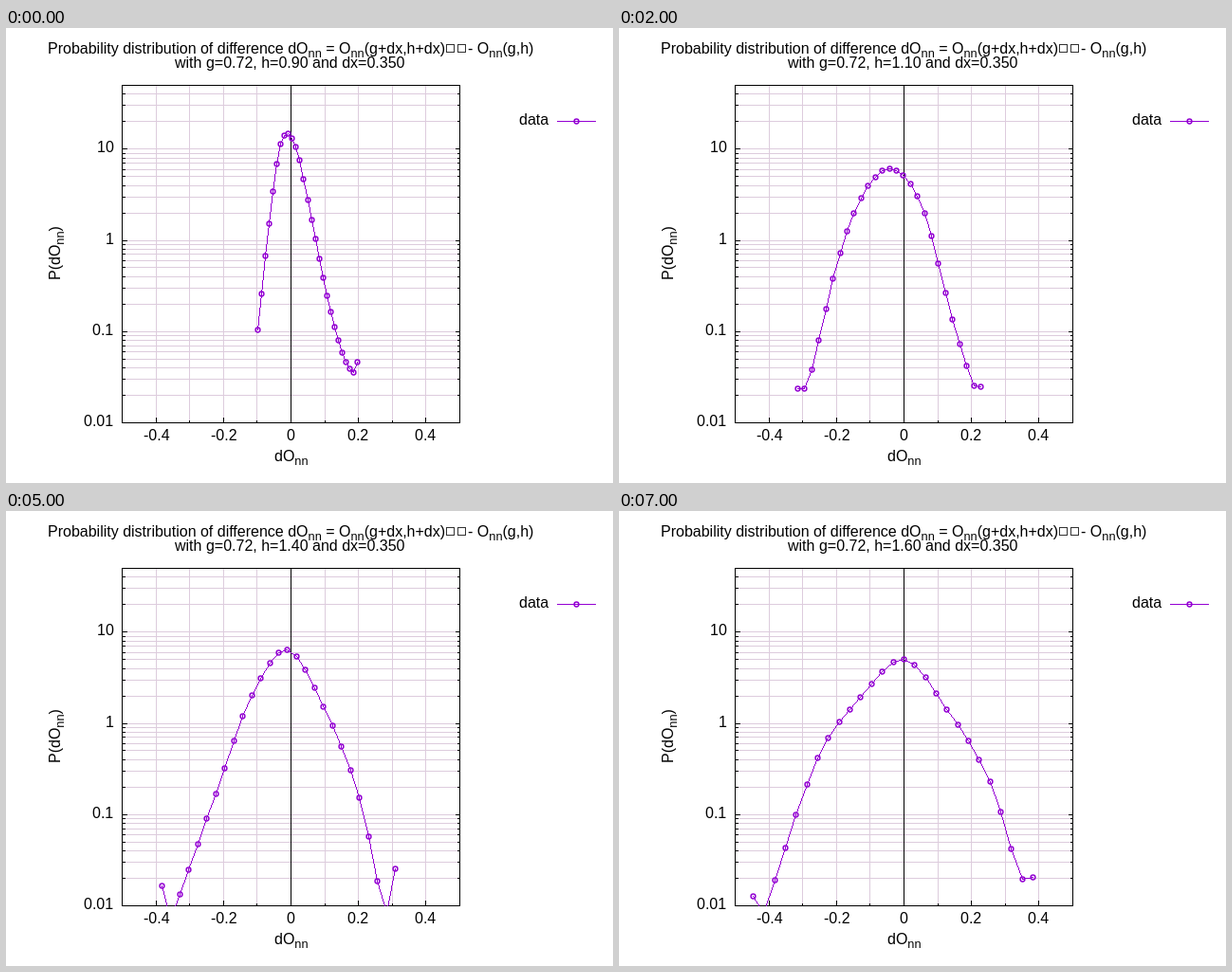
Recreate the animation shown at these times as an HTML page with a canvas. Size 640x480 px, loop 8 s.

```html
<!DOCTYPE html>
<html lang="en">
<head>
<meta charset="utf-8">
<title>Probability distribution</title>
<style>
html, body { margin: 0; width: 640px; height: 480px; overflow: hidden; background: #fff; }
canvas { display: block; }
</style>
</head>
<body>
<canvas id="stage" width="640" height="480"></canvas>
<script>
const ctx = document.getElementById('stage').getContext('2d');
const VIOLET = '#9400d3', GRID = '#ddccdd';
const FONT = '"Liberation Sans", Arial, sans-serif';
const BOX = { left: 122, top: 60, size: 356 };
const BOTTOM = BOX.top + BOX.size, RIGHT = BOX.left + BOX.size;
const DECADE = BOX.size / Math.log10(5000);
const STEP_MS = 1000, BINS = 27;

const px = v => Math.round(300 + BOX.size * v);
const py = v => Math.round(BOTTOM - DECADE * Math.log10(v / 0.01));

// Each curve has a few key heights at these bins; a spline gives the rest.
const KEY_BINS = [0, 1, 2, 6, 10, 14, 18, 22, 25, 26];
const h090 = [318, 280, 240, 122, 125, 202, 282, 342, 363, 352];
const h100 = [379, 380, 336, 199, 141, 147, 209, 321, 346, 372];
const h120 = [369, 428, 370, 261, 177, 138, 167, 279, 393, 369];
const h130 = [383, 432, 406, 319, 228, 144, 155, 265, 347, 369];
const h140 = [395, 430, 404, 298, 194, 146, 206, 302, 423, 377];
const h160 = [406, 424, 389, 260, 196, 156, 209, 285, 388, 386];

const blend = (a, b, drop, lowest) =>
  a.map((y, i) => Math.min((y + b[i]) / 2 + drop, lowest));

const curves = [
  { from: 265, to: 370, keys: h090 },
  { from: 226, to: 371, keys: h100 },
  { from: 188, to: 381, keys: blend(h100, h120, 7, 380) },
  { from: 186, to: 364, keys: h120 },
  { from: 184, to: 370, keys: h130 },
  { from: 164, to: 410, keys: h140 },
  { from: 155, to: 424, keys: blend(h140, h160, 0, 430) },
  { from: 141, to: 436, keys: h160 }
];

function spline(keys, bin) {
  const last = KEY_BINS.length - 1;
  const slope = k => {
    const a = Math.max(k - 1, 0), b = Math.min(k + 1, last);
    return (keys[b] - keys[a]) / (KEY_BINS[b] - KEY_BINS[a]);
  };
  const i = Math.max(KEY_BINS.findIndex(b => b >= bin), 1) - 1;
  const w = KEY_BINS[i + 1] - KEY_BINS[i];
  const t = (bin - KEY_BINS[i]) / w, s = 1 - t;
  return s * s * ((1 + 2 * t) * keys[i] + t * w * slope(i)) +
         t * t * ((1 + 2 * s) * keys[i + 1] - s * w * slope(i + 1));
}

function rect(color, x, y, w, h) {
  ctx.fillStyle = color;
  ctx.fillRect(x, y, w, h);
}

function pixelLine(x0, y0, x1, y1) {
  const n = Math.max(Math.abs(x1 - x0), Math.abs(y1 - y0));
  for (let i = 0; i <= n; i++) {
    rect(VIOLET, Math.round(x0 + (x1 - x0) * i / n), Math.round(y0 + (y1 - y0) * i / n), 1, 1);
  }
}

function marker(x, y) {
  ctx.strokeStyle = VIOLET;
  ctx.lineWidth = 1.5;
  ctx.beginPath();
  ctx.arc(x + 0.5, y + 0.5, 2.4, 0, 2 * Math.PI);
  ctx.stroke();
  rect(VIOLET, x, y, 1, 1);
}

// "anchor" is the share of the width left of x: 0.5 centres, 1 aligns right.
function text(str, x, y, anchor = 0.5) {
  ctx.font = '16px ' + FONT;
  ctx.fillStyle = '#000';
  ctx.fillText(str, Math.round(x - anchor * ctx.measureText(str).width), y);
}

// "_" stands for the subscript nn, "#" for an empty glyph box.
function richText(str, x, y) {
  for (const part of str.split(/([_#])/)) {
    if (part === '#') {
      ctx.strokeStyle = '#333';
      ctx.lineWidth = 1;
      ctx.strokeRect(Math.round(x) + 1.5, y - 9.5, 8, 8);
      x += 12;
      continue;
    }
    const sub = part === '_', run = sub ? 'nn' : part;
    ctx.font = (sub ? 12.8 : 16) + 'px ' + FONT;
    ctx.fillStyle = '#000';
    ctx.fillText(run, x, sub ? y + 4 : y);
    x += ctx.measureText(run).width;
  }
}

function drawAxes() {
  const xs = [], ys = [];
  for (let k = -4; k <= 4; k++) xs.push({ at: px(k / 10), major: k % 2 === 0, label: k / 10 });
  for (let e = -2; e <= 1; e++) {
    for (let m = 1; m <= 9; m++) {
      const v = m * 10 ** e;
      if (v < 45) ys.push({ at: py(v), major: m === 1, label: (10 ** e).toFixed(Math.max(0, -e)) });
    }
  }
  for (const t of xs) rect(GRID, t.at, BOX.top, 1, BOX.size);
  for (const t of ys) rect(GRID, BOX.left, t.at, BOX.size, 1);
  for (const t of xs) {
    const length = t.major ? 5 : 2;
    rect('#000', t.at, BOTTOM - length, 1, length);
    if (t.major) text(t.label, t.at + 0.5, 435);
  }
  for (const t of ys) {
    const length = t.major ? 4 : 2;
    rect('#000', BOX.left, t.at, length + 2, 1);
    rect('#000', RIGHT - length, t.at, length, 1);
    if (t.major) text(t.label, 113.5, t.at + 4, 1);
  }
  ctx.strokeStyle = '#000';
  ctx.lineWidth = 1;
  ctx.strokeRect(BOX.left + 0.5, BOX.top + 0.5, BOX.size, BOX.size);
  rect('#000', px(0), BOX.top, 1, BOX.size);
}

function drawLabels(h) {
  richText('Probability distribution of difference dO_ = O_(g+dx,h+dx)##- O_(g,h)', 44, 27);
  text(`with g=0.72, h=${h.toFixed(2)} and dx=0.350`, 299.5, 42);
  richText('dO_', 283, 457);
  ctx.save();
  ctx.translate(57, 266);
  ctx.rotate(-Math.PI / 2);
  richText('P(dO_)', 0, 0);
  ctx.restore();
  text('data', 572, 102, 1);
  pixelLine(581, 98, 621, 98);
  marker(601, 98);
}

function drawCurve({ from, to, keys }) {
  const points = Array.from({ length: BINS }, (_, i) =>
    [Math.round(from + (to - from) * i / (BINS - 1)), Math.round(spline(keys, i))]);
  ctx.save();
  ctx.beginPath();
  ctx.rect(BOX.left, BOX.top, BOX.size + 1, BOX.size + 1);
  ctx.clip();
  points.slice(1).forEach((p, i) => pixelLine(...points[i], ...p));
  ctx.restore();
  for (const [x, y] of points) if (y <= BOTTOM) marker(x, y);
}

function render(now) {
  const step = Math.floor(now / STEP_MS) % curves.length;
  rect('#fff', 0, 0, 640, 480);
  drawAxes();
  drawLabels(0.9 + step / 10);
  drawCurve(curves[step]);
}

function loop() {
  render(performance.now());
  requestAnimationFrame(loop);
}
loop();
</script>
</body>
</html>
```
